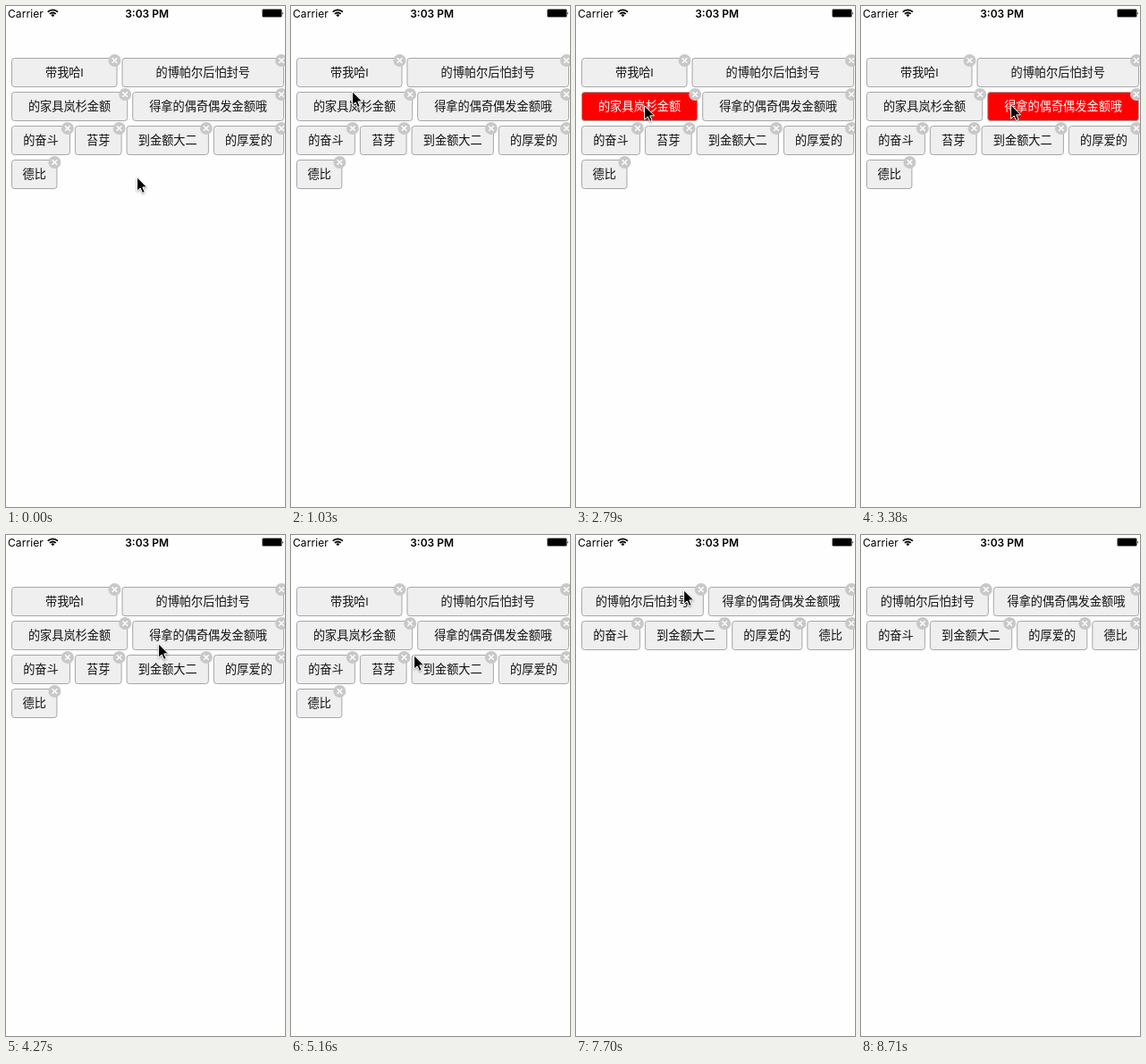
Recreate the animation shown at these times as an HTML page. Size 312 by 561 pixels, loop 9.68 s.

```html
<!DOCTYPE html>
<html lang="zh">
<head>
<meta charset="utf-8">
<style>
  html, body { margin: 0; width: 100%; height: 100%; overflow: hidden; background: #fefefe; }
  svg { display: block; width: 312px; height: 561px; }
  .bar { font: 12px Inter, "Liberation Sans", sans-serif; }
  .tag text { font: 13.2px "Liberation Sans", "Noto Sans CJK SC", "Noto Sans CJK", sans-serif; text-anchor: middle; fill: #111; }
  .tag rect { fill: #efefef; stroke: #a6a6a6; }
  .tag circle { fill: #c8c8c8; }
  .tag path { stroke: #fff; stroke-width: 1.5; }
  .on rect { fill: #f00; }
  .on text { fill: #fff; }
  #cursor { stroke: #fff; filter: drop-shadow(0 1px 1px rgba(0, 0, 0, .35)); }
</style>
</head>
<body>
<svg viewBox="0 0 312 561">
  <g class="bar">
    <text x="2" y="12.6" letter-spacing=".1">Carrier</text>
    <text x="157.6" y="12.6" text-anchor="middle" font-weight="600">3:03 PM</text>
  </g>
  <g fill="none" stroke="#000" stroke-width="1.8">
    <path d="M46.7 6.6a8 8 0 0 1 11.2 0M48.9 8.9a4.8 4.8 0 0 1 6.8 0"/>
    <path d="M50.4 10.3a2.7 2.7 0 0 1 3.8 0L52.3 12.3Z" fill="#000" stroke="none"/>
  </g>
  <rect x="286.5" y="3.5" width="22" height="9" rx="1.5" fill="none" stroke="#777" stroke-width=".8"/>
  <rect x="287" y="4" width="21" height="8" rx=".6"/>
  <path d="M309 6.4q1.7 1.7 0 3.4z"/>
  <g id="tags"></g>
  <path id="cursor" d="M.6 .8V16.2L4.2 12.9 6.6 18.4 9.2 17.3 6.8 11.9H11.6Z"/>
</svg>
<script>
const LOOP = 9680, FIRST = 284, STEP = 147.3;
const LEFT = 6, WIDTH = 305, GAP = 5, PAD = 25, EM = 13.2;
const labels = ['带我哈l', '的博帕尔后怕封号', '的家具岚杉金额', '得拿的偶奇偶发金额哦',
  '的奋斗', '苔芽', '到金额大二', '的厚爱的', '德比'];

// All times below count steps of STEP ms.
const removals = [[5, 37], [2, 45], [0, 50]];                    // label, time
const presses = [[0, 8, 9], [1, 12, 14], [2, 17, 18], [3, 21, 22]]; // label, down, up
const moves = [                                                  // start, end, x, y
  [-1, 5, 68, 95], [5, 7, 63, 72], [8, 12, 180, 67], [13, 17, 76, 111],
  [17, 21, 167, 110], [21, 25, 94, 146], [25, 29, 195, 113], [30, 35, 126, 138],
  [38, 41, 129, 95], [42, 44, 131, 102], [46, 49, 120, 61], [50, 54, 233, 482],
  [54, 57, 246, 575]
];

const easeOut = u => 1 - (1 - u) ** 2;

function cursorAt(n) {
  let x = 146, y = 191;
  for (const [start, end, toX, toY] of moves) {
    if (n <= start) break;
    const e = easeOut(Math.min(1, (n - start) / (end - start)));
    x += (toX - x) * e;
    y += (toY - y) * e;
  }
  return [Math.round(x), Math.round(y)];
}

const textWidth = s => [...s].reduce((w, c) => w + (c === 'l' ? 3 : EM), 0);

// Wrap the tags and share the free space of each full row among its tags
function layout(ids) {
  const rows = [[]];
  const used = row => row.reduce((w, id) => w + textWidth(labels[id]) + PAD, (row.length - 1) * GAP);
  for (const id of ids) {
    const row = rows[rows.length - 1];
    if (used([...row, id]) > WIDTH) rows.push([id]);
    else row.push(id);
  }
  return rows.flatMap((row, r) => {
    const free = WIDTH - used(row);
    const full = r < rows.length - 1 || free < PAD;
    let x = LEFT;
    return row.map(id => {
      const w = textWidth(labels[id]) + PAD + (full ? free / row.length : 0);
      const box = { id, x, w, y: 58 + 38 * r };
      x += w + GAP;
      return box;
    });
  });
}

const tag = ({ id, x, y, w }, pressed) => `
  <g class="tag ${pressed ? 'on' : ''}" transform="translate(${x} ${y})">
    <rect x=".5" y=".5" width="${w - 1}" height="32" rx="3"/>
    <text x="${w / 2}" y="21.4">${labels[id]}</text>
    <circle cx="${w - 3}" cy="3" r="7"/>
    <path d="M${w - 5.8} .2l5.6 5.6m0-5.6l-5.6 5.6"/>
  </g>`;

const tags = document.getElementById('tags');
const cursor = document.getElementById('cursor');
let shown;

function draw(now) {
  const n = Math.floor((now % LOOP - FIRST) / STEP);
  if (n !== shown) {
    shown = n;
    const gone = removals.filter(r => n >= r[1]).map(r => r[0]);
    const ids = [...labels.keys()].filter(id => !gone.includes(id));
    const press = presses.find(([, down, up]) => n >= down && n < up);
    tags.innerHTML = layout(ids).map(b => tag(b, press && press[0] === b.id)).join('');
    cursor.setAttribute('transform', `translate(${cursorAt(n)})`);
  }
  requestAnimationFrame(draw);
}
draw(performance.now());
</script>
</body>
</html>
```
